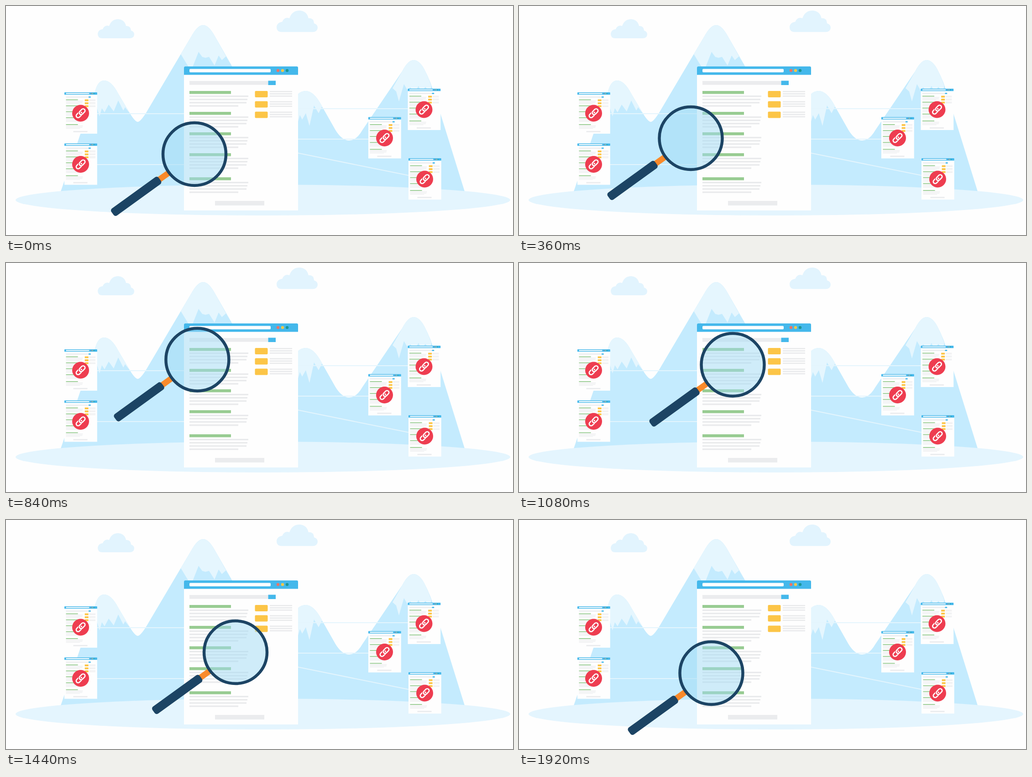
Recreate the animation shown at these times as an HTML page. Size 1111 by 504 pixels, loop 2040 ms.

```html
<!DOCTYPE html>
<html lang="en">
<head>
<meta charset="utf-8">
<title>Link search</title>
<style>
html, body { margin: 0; width: 100%; height: 100%; overflow: hidden; background: #fefefe; }
svg { display: block; width: 1111px; height: 504px; }
</style>
</head>
<body>
<svg viewBox="0 0 1111 504" xmlns="http://www.w3.org/2000/svg">
  <defs>
    <g id="page">
      <path d="M0 3q0-3 3-3H247q3 0 3 3V317H0z" fill="#fefefe"/>
      <path d="M0 18.500V3q0-3 3-3H247q3 0 3 3V18.500z" fill="#44b8eb"/>
      <rect x="12" y="5.500" width="178" height="7.500" rx="2" fill="#fefefe"/>
      <circle cx="206" cy="9" r="3.200" fill="#ee7467"/>
      <circle cx="216" cy="9" r="3.200" fill="#f8c848"/>
      <circle cx="226" cy="9" r="3.200" fill="#1d9797"/>
      <rect x="12" y="32" width="172" height="8.500" fill="#ebecee"/>
      <rect x="184.500" y="31.500" width="16.500" height="9.500" fill="#44b8eb"/>
      <g id="rows"></g>
      <rect x="68" y="296" width="108" height="10" fill="#ebecee"/>
    </g>
    <g id="badge">
      <circle r="18.500" fill="#ee3d50"/>
      <g transform="rotate(-45)" fill="none">
        <rect id="ring" x="-12" y="-4.200" width="14.500" height="8.400" rx="4.200" stroke="#fff" stroke-width="2.600"/>
        <rect x="-2.500" y="-4.200" width="14.500" height="8.400" rx="4.200" stroke="#ee3d50" stroke-width="5"/>
        <rect x="-2.500" y="-4.200" width="14.500" height="8.400" rx="4.200" stroke="#fff" stroke-width="2.600"/>
        <path d="M-3.500 4.200H-1.500" stroke="#fff" stroke-width="2.600"/>
      </g>
    </g>
    <path id="cloud" d="M10 42Q0 42 0 32Q1 23 11 22Q15 12 25 15Q30 0 45 0Q59 1 62 15Q72 14 73 25Q80 27 80 34Q79 42 70 42z" fill="#e2f4fe"/>
  </defs>

  <rect width="1111" height="504" fill="#fefefe"/>
  <use href="#cloud" x="201" y="29"/>
  <use href="#cloud" transform="translate(593 10) scale(1.125)"/>

  <g fill="#c4ebfe">
    <path d="M120 408L197 182Q203 164 215 164Q231 164 246 193L272 237Q283 255 289 255Q295 254 307 235L383 106L409 62Q421 42 432 42Q443 42 455 62L495 132L600 300L628 215Q637 187 657 187Q672 187 687 211L722 273Q736 296 752 296Q768 296 781 273L868 144Q881 119 893 119Q906 119 917 140Q931 167 940 198L1005 408z"/>
  </g>
  <g fill="#e5f6fe">
    <path d="M192 198L197 182Q203 164 215 164Q231 164 246 193L272 237L261 223L257 230L246 208L236 232L225 217L216 234L210 225L205 243L200 226z"/>
    <path d="M383 106L409 62Q421 42 432 42Q443 42 455 62L494 132L482 111L473 119L466 109L457 131L445 112L437 114L430 112L422 101L409 134H400z"/>
    <path d="M628 215Q637 187 657 187Q672 187 687 211L698 230L692 222L685 236L675 219L665 264L657 236L649 250L644 240L639 258z"/>
    <path d="M847 181L868 144Q881 119 893 119Q906 119 917 140Q926 158 932 176L928 190L919 178L910 190L904 176L895 191L886 179L879 184L872 172L861 210L855 188z"/>
  </g>
  <ellipse cx="563" cy="427" rx="542" ry="34" fill="#e4f5fe"/>
  <path d="M199 237H391M199 349H391M639 293H795M639 226H882M639 323.500L883 373" fill="none" stroke="#e4f5fd" stroke-width="2"/>

  <g id="cards"></g>
  <use href="#page" x="390" y="133"/>

  <g id="lens">
    <g transform="rotate(144)">
      <rect x="70" y="-6.500" width="28" height="13" fill="#f98a2b"/>
      <rect x="94" y="-9.500" width="128" height="19" rx="5.500" fill="#1c4464"/>
    </g>
    <circle r="69" fill="#a1dbf5" fill-opacity=".5" stroke="#1c4464" stroke-width="6.500"/>
  </g>
</svg>
<script>
const $ = id => document.getElementById(id);
const bar = (x, y, w, h, fill, rx = 0) =>
  `<rect x="${x}" y="${y}" width="${w}" height="${h}" rx="${rx}" fill="${fill}"/>`;

let rows = '';
for (const y of [54, 100, 145, 191, 244]) {
  rows += bar(12, y, 91, 6.5, '#98cc92');
  [129, 127, 125, 107].forEach((w, i) => rows += bar(12, y + 10 + i * 7.1, w, 3.2, '#e9eaec'));
}
for (const y of [54, 76.5, 99.5]) {
  rows += bar(155.5, y, 28, 14, '#fcc547', 2);
  for (let i = 0; i < 3; i++) rows += bar(188, y + i * 5, 49, 2.6, '#e9eaec');
}
$('rows').innerHTML = rows;

const cards = [[128, 190], [128, 302.5], [880.5, 182], [794, 244.5], [882, 335]];
$('cards').innerHTML = cards.map(([x, y]) =>
  `<use href="#page" transform="translate(${x} ${y}) scale(.287)"/>
   <use href="#badge" x="${x + 35.5}" y="${y + 46}"/>`).join('');

// Lens orbit: time, then centre position
const LOOP = 2040, STEP = 120, CX = 435, CY = 283;
const stops = [[0, 413, 326], [360, 376.5, 291], [600, 376.5, 241], [1080, 468.5, 224],
  [1440, 503, 291], [1680, 468.5, 344], [1920, 421.5, 337]];

let last = 0;
const orbit = stops.map(([t, x, y], i) => {
  let a = Math.atan2(y - CY, x - CX);
  while (i && a < last) a += 2 * Math.PI;
  last = a;
  return [t, a, Math.hypot(x - CX, y - CY)];
});

function knot(i) {
  const n = orbit.length, turn = Math.floor(i / n), [t, a, r] = orbit[i - turn * n];
  return [t + turn * LOOP, a + turn * 2 * Math.PI, r];
}

// Weighted slope through neighbouring knots
function slope(i, k) {
  const p = knot(i - 1), q = knot(i), s = knot(i + 1);
  const d0 = q[0] - p[0], d1 = s[0] - q[0];
  return ((q[k] - p[k]) / d0 * d1 + (s[k] - q[k]) / d1 * d0) / (d0 + d1);
}

function sample(t, k) {
  let i = 0;
  while (knot(i + 1)[0] <= t) i++;
  const p = knot(i), q = knot(i + 1), d = q[0] - p[0], u = (t - p[0]) / d, v = 1 - u;
  return v * v * (1 + 2 * u) * p[k] + u * u * (3 - 2 * u) * q[k]
    + d * u * v * (v * slope(i, k) - u * slope(i + 1, k));
}

function draw(now) {
  const t = Math.floor(now % LOOP / STEP) * STEP;
  const a = sample(t, 1), r = sample(t, 2);
  $('lens').setAttribute('transform',
    `translate(${(CX + r * Math.cos(a)).toFixed(2)} ${(CY + r * Math.sin(a)).toFixed(2)})`);
}

let start;
function tick(now) {
  start ??= now;
  draw(Math.max(0, now - start));
  requestAnimationFrame(tick);
}
draw(0);
requestAnimationFrame(tick);
</script>
</body>
</html>
```
